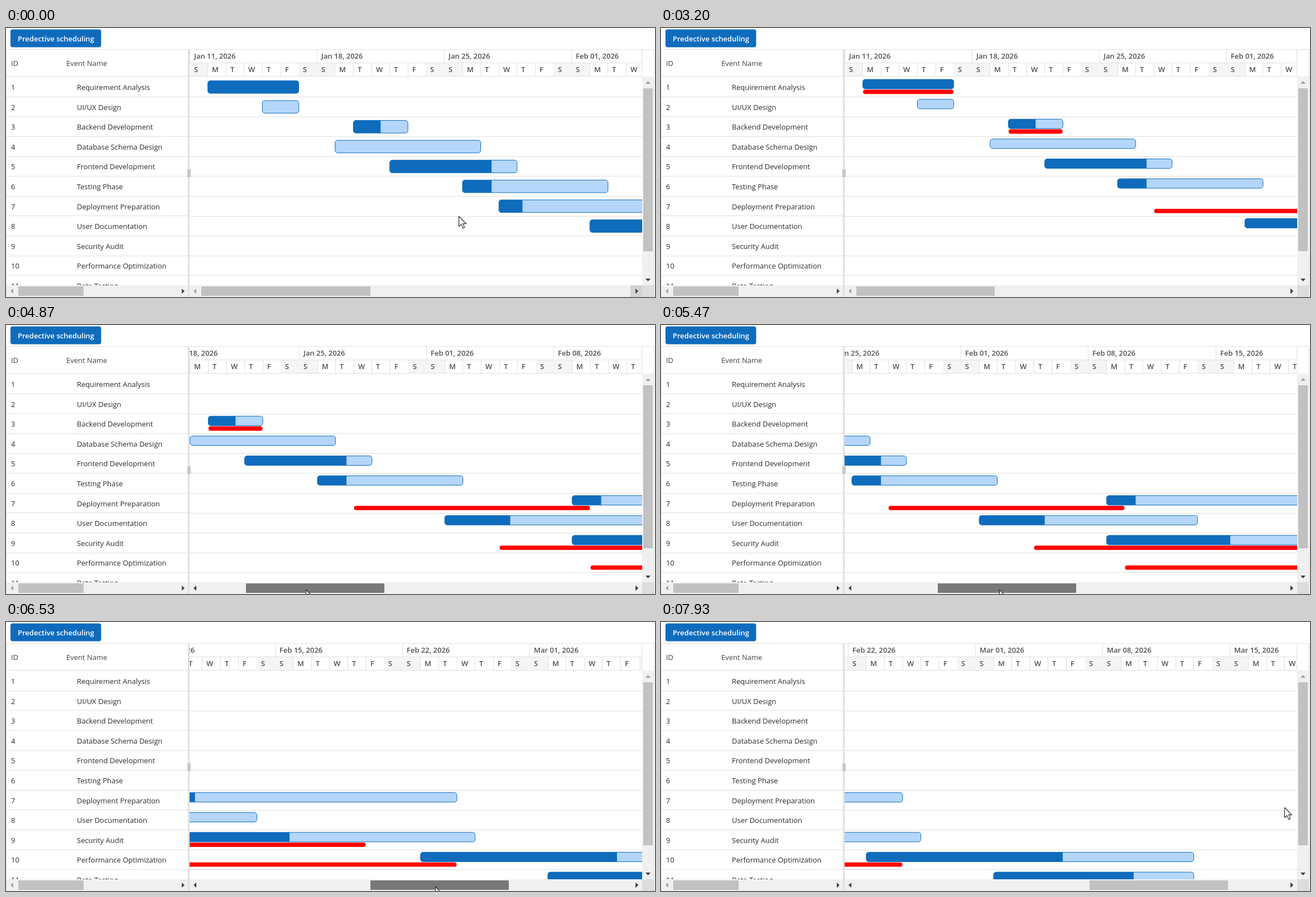
Animation, 1163 px wide and 482 px high, one loop 8000 ms. Source, as an HTML page with a canvas:

```html
<!DOCTYPE html>
<html lang="en">
<head>
<meta charset="utf-8">
<title>Gantt chart</title>
<style>
html, body { margin: 0; width: 100%; height: 100%; overflow: hidden; background: #fff; }
canvas { display: block; width: 1163px; height: 482px; }
</style>
</head>
<body>
<canvas id="stage"></canvas>
<script>
const W = 1163, H = 482, LOOP = 8000, FPS = 15;
const BLUE = '#0f6cbd', LIGHT = '#b4d6fa', LINE = '#e0e0e0', RED = '#ff0000';
const DARK_ARROW = '#404040', PALE_ARROW = '#a3a3a3';
const LEFT = 329, RIGHT = 1140, TOP = 87, BOTTOM = 461;
const DAY = 32.6, ROW = 35.6, THUMB_RATIO = 3.265;
const FONT = '"Open Sans", "Noto Sans", sans-serif';

const canvas = document.getElementById('stage');
const dpr = window.devicePixelRatio || 1;
canvas.width = W * dpr;
canvas.height = H * dpr;
const ctx = canvas.getContext('2d');

// span: days from Jan 11; old: the planned span where the task has moved
const tasks = [
  { name: 'Requirement Analysis', span: [1, 6], done: 1, base: [1, 6] },
  { name: 'UI/UX Design', span: [4, 6], done: 0 },
  { name: 'Backend Development', span: [9, 12], done: 0.5, base: [9, 12] },
  { name: 'Database Schema Design', span: [8, 16], done: 0 },
  { name: 'Frontend Development', span: [11, 18], done: 0.8 },
  { name: 'Testing Phase', span: [15, 23], done: 0.2 },
  { name: 'Deployment Preparation', span: [29, 45], old: [17, 30], done: 0.1, base: [17, 30] },
  { name: 'User Documentation', span: [22, 34], done: 0.3 },
  { name: 'Security Audit', span: [29, 46], old: [25, 40], done: 0.4, base: [25, 40] },
  { name: 'Performance Optimization', span: [43, 61], old: [30, 45], done: 0.6, base: [30, 45] },
  { name: 'Beta Testing', span: [50, 61], done: 0.7 }
];

// Keys are [step, value, ...] with 15 steps per second
const scrollKeys = [[70, 0], [71, 60], [73, 260], [75, 372], [78, 372],
  [89, 657], [98, 988], [104, 1363]];
const approach = [[0, 811, 337], [1, 600, 252], [2, 397, 172], [4, 397, 172],
  [7, 215, 92], [10, 105, 36], [12, 93, 27], [33, 93, 27], [37, 200, 160],
  [41, 380, 420], [43, 420, 500]];
const enter = [[56, 428, 492], [58, 440, 474], [61, 453, 463], [63, 453, 463], [64, 454, 474]];
const leave = [[110, 888, 474], [111, 900, 468], [113, 985, 405], [116, 1071, 335],
  [117, 1071, 335], [118, 1098, 334], [119, 1117, 332]];

const arrowShape = new Path2D('M.5 .5V18.5L4.8 14.6L7.8 21.8L10.8 20.5L7.8 13.6H13.6Z');
const handShape = new Path2D('M-2.5 12V2Q-2.5-.5 0-.5Q2-.5 2 2V8Q4 6.5 5.5 8.5Q7.5 7.5 8.5 9.5' +
  'Q11.5 9 11.5 12V15Q11 18 9.5 21.5H-1Q-3 17-6.5 13Q-7 10-4.5 10.5Z');

function track(keys, step) {
  if (step <= keys[0][0]) return keys[0].slice(1);
  for (let i = 1; i < keys.length; i++) {
    const a = keys[i - 1], b = keys[i];
    if (step <= b[0]) {
      const p = (step - a[0]) / (b[0] - a[0]);
      return a.slice(1).map((v, j) => v + (b[j + 1] - v) * p);
    }
  }
  return keys[keys.length - 1].slice(1);
}

function fill(color, x, y, w, h) {
  ctx.fillStyle = color;
  ctx.fillRect(x, y, w, h);
}

function text(str, x, y, color = '#2b2b2b', weight = 400) {
  ctx.font = `${weight} 13px ${FONT}`;
  ctx.fillStyle = color;
  ctx.fillText(str, x, y);
}

function round(color, x, y, w, h, r) {
  ctx.fillStyle = color;
  ctx.beginPath();
  ctx.roundRect(x, y, w, h, r);
  ctx.fill();
}

function clipped(x, y, w, h, draw) {
  ctx.save();
  ctx.beginPath();
  ctx.rect(x, y, w, h);
  ctx.clip();
  draw();
  ctx.restore();
}

// Small triangle pointing along (dx, dy)
function arrow(x, y, dx, dy, color) {
  ctx.fillStyle = color;
  ctx.beginPath();
  ctx.moveTo(x + dx * 3, y + dy * 3);
  ctx.lineTo(x - dx * 2 + dy * 4.5, y - dy * 2 + dx * 4.5);
  ctx.lineTo(x - dx * 2 - dy * 4.5, y - dy * 2 - dx * 4.5);
  ctx.fill();
}

const rowTop = i => TOP + 0.6 + ROW * i;
const dayX = (d, scroll) => LEFT + d * DAY - scroll;

function drawButton(step) {
  const pressed = step === 19 || step === 20;
  const hover = step >= 10 && step < 34;
  round(pressed ? '#0c3b5e' : hover ? '#115ea3' : BLUE, 8, 2.5, 162.5, 32, 4);
  text('Predective scheduling', 21, 24, '#fff', 600);
}

function drawTable() {
  text('ID', 9, 68, '#424242');
  text('Event Name', 108, 68, '#424242');
  fill(LINE, 0, 86, 326, 1);
  clipped(0, TOP, 326, BOTTOM - TOP, () => {
    tasks.forEach((task, i) => {
      const y = Math.round(111 + ROW * i);
      text(String(i + 1), 9, y);
      text(task.name, 127, y);
      fill(LINE, 0, Math.floor(rowTop(i + 1)), 326, 1);
    });
  });
}

function drawHeader(scroll) {
  clipped(LEFT, 39, RIGHT - LEFT, 48, () => {
    const first = Math.floor(scroll / DAY / 7) * 7;
    for (let d = first; d < first + 35; d++) {
      const x = Math.floor(dayX(d, scroll)), next = Math.floor(dayX(d + 1, scroll));
      const wd = d % 7;
      if (wd === 0 || wd === 6) fill('#f5f5f5', x, 63, next - x, 23);
      fill(LINE, next, 63, 1, 23);
      text('SMTWTFS'[wd], x + 8, 79, '#505050', 600);
      if (wd === 0) {
        const date = new Date(Date.UTC(2026, 0, 11 + d));
        const month = ['Jan', 'Feb', 'Mar', 'Apr'][date.getUTCMonth()];
        const day = String(date.getUTCDate()).padStart(2, '0');
        text(`${month} ${day}, 2026`, x + 8, 55, '#505050', 600);
        fill(LINE, x, 39, 1, 24);
      }
    }
    fill(LINE, LEFT, 62, RIGHT - LEFT, 1);
    fill(LINE, LEFT, 86, RIGHT - LEFT, 1);
  });
  fill(LINE, RIGHT - 1, 39, 1, 48);
}

function drawBar(x, y, w, h, done) {
  ctx.save();
  ctx.beginPath();
  ctx.roundRect(x, y, w, h, 4.5);
  ctx.fillStyle = LIGHT;
  ctx.fill();
  ctx.clip();
  fill(BLUE, x, y, w * done, h);
  ctx.restore();
  ctx.strokeStyle = BLUE;
  ctx.lineWidth = 1;
  ctx.beginPath();
  ctx.roundRect(x, y, w, h, 4.5);
  ctx.stroke();
}

function drawChart(scroll, planned) {
  clipped(LEFT, TOP, RIGHT - LEFT, BOTTOM - TOP, () => {
    tasks.forEach((task, i) => {
      fill(LINE, LEFT, Math.round(TOP + 0.4 + ROW * (i + 1)), RIGHT - LEFT, 1);
    });
    tasks.forEach((task, i) => {
      const y = rowTop(i);
      const [a, b] = planned ? task.span : task.old || task.span;
      const x = dayX(a, scroll), w = (b - a) * DAY;
      if (planned) drawBar(x, y + 4.5, w, 17, task.done);
      else drawBar(x, y + 6.8, w, 22.6, task.done);
      if (planned && task.base) {
        const [from, to] = task.base;
        round(RED, dayX(from, scroll) + 0.5, y + 22.8, (to - from) * DAY - 1, 7.8, 3.9);
      }
    });
  });
}

function drawScrollbars(step, scroll, planned) {
  const track = '#f0f0f0', thumb = '#c1c1c1';

  fill(track, 1, BOTTOM, 325, 21);
  fill(thumb, 22, 463, 117, 17);
  arrow(11, 471.5, -1, 0, PALE_ARROW);
  arrow(317, 471.5, 1, 0, DARK_ARROW);

  fill(track, LEFT, BOTTOM, RIGHT - LEFT, 21);
  if (step < 1) fill('#d2d2d2', 1119, BOTTOM, 21, 21);
  const held = step >= 68 && step < 111;
  const hover = step >= 59 && step < 112;
  fill(held ? '#787878' : hover ? '#a8a8a8' : thumb,
    Math.round(350.4 + scroll / THUMB_RATIO), 463, planned ? 248 : 303, 17);
  arrow(339, 471.5, -1, 0, scroll > 0 ? DARK_ARROW : PALE_ARROW);
  arrow(1130, 471.5, 1, 0, DARK_ARROW);

  fill(track, RIGHT, TOP, 21, BOTTOM - TOP);
  fill(thumb, 1142, 108, 17, 292);
  arrow(1150.5, 98, 0, -1, PALE_ARROW);
  arrow(1150.5, 451, 0, 1, DARK_ARROW);
  fill('#dcdcdc', RIGHT, BOTTOM, 21, 21);
  if (step < 1) fill('#d2d2d2', 1119, BOTTOM, 21, 21);
  arrow(1130, 471.5, 1, 0, DARK_ARROW);
}

function drawFrame() {
  fill(LINE, 0, 38, 1162, 1);
  fill(LINE, 0, 38, 1, H - 38);
  fill(LINE, 1161, 38, 1, H - 38);
  fill(LINE, 326, 39, 3, H - 39);
  fill('#fff', 326, 253, 4, 14);
  fill('#616161', 326, 253, 1, 14);
  fill('#616161', 329, 253, 1, 14);
}

function drawSpinner(step) {
  const start = (step - 21) / FPS / 1.3 * Math.PI * 2 - Math.PI / 2;
  ctx.lineWidth = 2;
  [[LIGHT, Math.PI * 2], [BLUE, Math.PI / 2]].forEach(([color, sweep]) => {
    ctx.strokeStyle = color;
    ctx.beginPath();
    ctx.arc(581.5, 370.5, 15, start, start + sweep);
    ctx.stroke();
  });
}

function cursorAt(step, scroll) {
  if (step <= 43) return track(approach, step);
  if (step < 57) return null;
  if (step < 71) return track(enter, step);
  if (step < 111) return [453.5 + 1.043 * scroll / THUMB_RATIO, 474];
  return track(leave, step);
}

function drawCursor(step, scroll) {
  const pos = cursorAt(step, scroll);
  if (!pos) return;
  const [x, y] = pos.map(Math.round);
  const shape = x >= 8 && x < 170 && y >= 3 && y < 35 ? handShape : arrowShape;
  ctx.save();
  ctx.translate(x, y);
  ctx.fillStyle = '#fff';
  ctx.strokeStyle = '#202020';
  ctx.lineWidth = 1.1;
  ctx.lineJoin = 'round';
  ctx.fill(shape);
  ctx.stroke(shape);
  ctx.restore();
}

function render(now) {
  const step = Math.floor(((now % LOOP) + 5) * FPS / 1000) % (LOOP * FPS / 1000);
  const scroll = Math.round(track(scrollKeys, step)[0]);
  const planned = step >= 47;
  ctx.setTransform(dpr, 0, 0, dpr, 0, 0);
  fill('#fff', 0, 0, W, H);
  drawButton(step);
  drawTable();
  drawHeader(scroll);
  drawChart(scroll, planned);
  drawScrollbars(step, scroll, planned);
  drawFrame();
  if (step >= 21 && !planned) drawSpinner(step);
  drawCursor(step, scroll);
}

let origin = null;
function tick(now) {
  if (origin === null) origin = now;
  render(now - origin);
  requestAnimationFrame(tick);
}
render(0);
requestAnimationFrame(tick);
</script>
</body>
</html>
```
